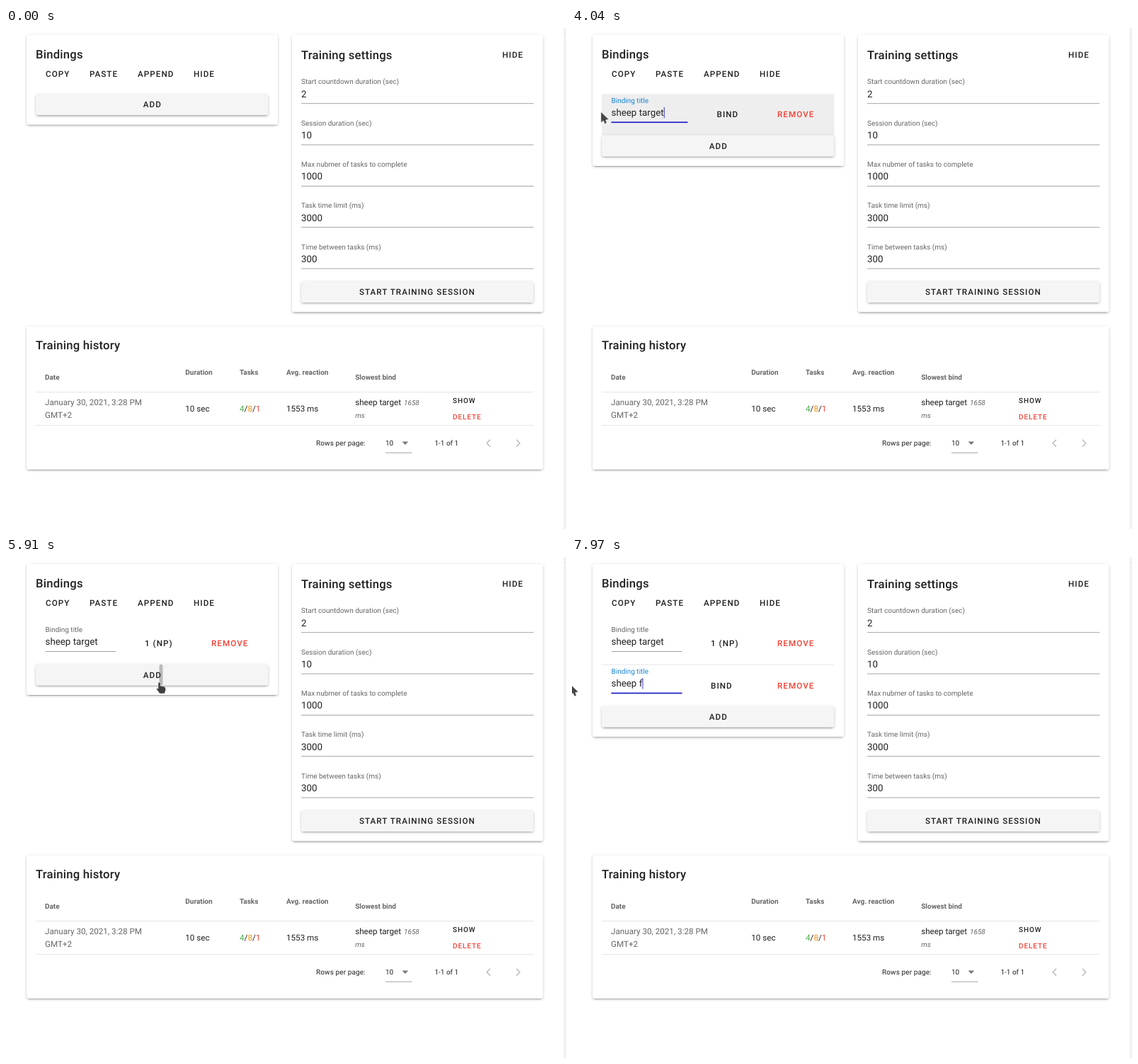
These frames come from a looping animation (791x708 px, 8 s). An HTML page:

```html
<!DOCTYPE html>
<html lang="en">
<head>
<meta charset="utf-8">
<title>Binding trainer</title>
<style>
html, body { margin: 0; width: 100%; height: 100%; overflow: hidden; background: #fff; }
svg { display: block; width: 791px; height: 708px; }
text { font-family: Roboto, sans-serif; white-space: pre; text-rendering: geometricPrecision; }
</style>
</head>
<body>
<svg viewBox="0 0 791 708" xmlns="http://www.w3.org/2000/svg">
  <g id="page"></g>
  <g id="live"></g>
</svg>
<script>
const LOOP = 8000;
const INK = '#212121', DIM = '#666', RED = '#f44336', LINE = '#949494', RULE = '#e0e0e0';
const BLUE = '#1d1cc4', LABEL_BLUE = '#1785d0';
const INPUT = 13.333, BUTTON = 11.667, SMALL = 10;
const ROW_TOP = 93.33, ROW_H = 58.33, ROW_STEP = 59.17, FIELD_X = 55.5;

const rect = (x, y, w, h, fill, extra = '') =>
  `<rect x="${x}" y="${y}" width="${w}" height="${h}" fill="${fill}" ${extra}/>`;
const text = (x, y, size, str, fill = INK, extra = '') =>
  `<text x="${x}" y="${y}" font-size="${size}" fill="${fill}" ${extra}>${str}</text>`;
const title = (x, y, str) =>
  text(x, y, 16.667, str, INK, 'font-weight="500" letter-spacing=".0125em"');
const caps = (x, y, str, fill = INK, size = BUTTON) =>
  text(x, y, size, str, fill, 'font-weight="500" letter-spacing=".0893em"');

// Raised surface with three soft shadows
function raised(x, y, w, h, fill) {
  const shade = (inset, dy, blur, alpha) =>
    rect(x + inset, y + inset + dy, w - 2 * inset, h - 2 * inset, '#000',
      `rx="3.3" fill-opacity="${alpha}" style="filter:blur(${blur}px)"`);
  return shade(1.67, 2.5, .42, .2) + shade(0, 1.67, .83, .14) + shade(0, .83, 2.08, .12) +
    rect(x, y, w, h, fill, 'rx="3.3"');
}

function settings() {
  const fields = [
    ['Start countdown duration (sec)', 2],
    ['Session duration (sec)', 10],
    ['Max nubmer of tasks to complete', 1000],
    ['Task time limit (ms)', 3000],
    ['Time between tasks (ms)', 300]
  ];
  return raised(404, 10, 354.6, 391.6, '#fff') +
    title(417, 44, 'Training settings') + caps(701, 42.2, 'HIDE') +
    fields.map(([label, value], i) => {
      const y = i * 58.33;
      return text(417, 79.3 + y, SMALL, label, DIM) + text(417, 97.8 + y, INPUT, value) +
        rect(417, 106.3 + y, 328.3, .85, LINE);
    }).join('') +
    raised(417, 358.2, 328.3, 30, '#f5f5f5') + caps(499, 377.3, 'START TRAINING SESSION');
}

function history() {
  const head = (x, y, str) => text(x, y, SMALL, str, DIM, 'font-weight="700"');
  const cell = (x, y, str, fill) => text(x, y, BUTTON, str, fill);
  const note = (x, y, str) => text(x, y, SMALL, str, DIM, 'font-style="italic"');
  const part = (fill, str) => `<tspan fill="${fill}">${str}</tspan>`;
  const chevron = (x, d) =>
    `<path d="M${x} 581.7l${d} 5l${-d} 5" fill="none" stroke="#b5b5b5" stroke-width="1.3"/>`;
  return raised(29, 421.5, 729.6, 202.5, '#fff') + title(42, 454, 'Training history') +
    head(55, 497.4, 'Date') + head(253.3, 490, 'Duration') + head(330, 490, 'Tasks') +
    head(396, 490, 'Avg. reaction') + head(493.2, 497.4, 'Slowest bind') +
    rect(42, 514.2, 703.3, .85, RULE) + rect(42, 561.2, 703.3, .85, RULE) +
    cell(55, 533.2, 'January 30, 2021, 3:28 PM', DIM) + cell(55, 550.8, 'GMT+2', DIM) +
    cell(253.3, 541.6, '10 sec') +
    cell(330, 541.6, part('#4caf50', 4) + '/' + part('#fb8c00', 8) + '/' + part(RED, 1)) +
    cell(396, 541.6, '1553 ms') + cell(493.2, 533.2, 'sheep target') +
    note(562, 533.2, '1658') + note(493.2, 550.8, 'ms') +
    caps(631, 529.8, 'SHOW', INK, SMALL) + caps(631, 553, 'DELETE', RED, SMALL) +
    text(438, 590, SMALL, 'Rows per page:', INK, 'letter-spacing=".1"') +
    text(536, 590, SMALL, '10') + text(605.4, 590, SMALL, '1-1 of 1') +
    rect(536, 599.8, 37.5, .85, LINE) +
    '<path d="M559.6 584.6h8.6l-4.3 4.4z" fill="#757575"/>' +
    chevron(684, -4.8) + chevron(721, 4.8);
}

document.getElementById('page').innerHTML =
  rect(0, 0, 791, 708, '#fff') + rect(787.5, 0, 3.5, 708, '#f1f1f1') +
  rect(788, 8, 3, .8, '#dcdcdc') + settings() + history();

const pen = document.createElement('canvas').getContext('2d');
pen.font = INPUT + 'px Roboto, sans-serif';
const widthOf = str => pen.measureText(str).width;
const clamp = v => Math.max(0, Math.min(1, v));
const easeOut = v => 1 - (1 - clamp(v)) ** 3;

// Pointer hotspot: time, x, y
const path = [
  [50, 488, 295], [200, 410, 240], [450, 280, 150], [650, 200, 112], [850, 217, 107],
  [950, 217, 107], [990, 220, 107], [1270, 220, 107], [1350, 160, 125], [1430, 87, 138],
  [1600, 112, 121], [1720, 112, 120], [2060, 47, 118], [2280, 41, 118], [4040, 41, 118],
  [4120, 33, 160], [4350, 259, 193], [4540, 250, 20], [4620, 235, 0], [4840, 222, 118],
  [5400, 222, 118], [5770, 217, 177], [5910, 217, 177], [6180, 88, 181],
  [6350, 112, 181], [6440, 112, 181], [6680, -2, 180], [8000, -2, 180]
];

const BOUND = 5400;
const rows = [
  { added: 1350, focus: 1720, blur: 4890, word: 'sheep target',
    keys: [2470, 2580, 2690, 2800, 2910, 3010, 3120, 3230, 3330, 3540, 3640, 3740] },
  { added: 5980, focus: 6480, blur: Infinity, word: 'sheep f',
    keys: [7020, 7220, 7290, 7440, 7700, 7870, 7970] }
];
const addClicks = [1270, 5910], bindClick = 4900;

function pointerAt(t) {
  if (t < path[0][0]) return { x: -99, y: -99 };
  const i = Math.max(1, path.findIndex(p => p[0] > t));
  const [t0, x0, y0] = path[i - 1], [t1, x1, y1] = path[i];
  const k = (t - t0) / (t1 - t0);
  return { x: x0 + (x1 - x0) * k, y: y0 + (y1 - y0) * k };
}

const inside = (p, x, y, w, h) => p.x >= x && p.x <= x + w && p.y >= y && p.y < y + h;

function rippleAlpha(dt) {
  return dt < 0 || dt > 400 ? 0 : .24 * (1 - clamp((dt - 200) / 200));
}

function drawInput(row, t, y, p) {
  const typed = row.keys.filter(k => k <= t).length;
  const str = typed ? row.word.slice(0, typed) : 'Bind title';
  const focused = t >= row.focus && t < row.blur;
  const base = y + 30.7;
  if (!focused) return text(FIELD_X, base, INPUT, str);
  if (typed) {
    const lit = (t - row.keys[typed - 1]) % 1000 < 500;
    return text(FIELD_X, base, INPUT, str) +
      (lit ? rect(FIELD_X + widthOf(str) + .2, y + 18.5, .9, 15.5, BLUE) : '');
  }
  let from = 0;
  while (from < str.length && FIELD_X + widthOf(str.slice(0, from + 1)) < p.x + 3) from++;
  const x = FIELD_X + widthOf(str.slice(0, from));
  return rect(x, y + 18.5, FIELD_X + widthOf(str) - x, 15.5, '#3390ff') +
    text(FIELD_X, base, INPUT, `${str.slice(0, from)}<tspan fill="#fff">${str.slice(from)}</tspan>`);
}

function drawRow(i, t, p) {
  const row = rows[i], y = ROW_TOP + i * ROW_STEP;
  const bound = t >= BOUND;
  const fieldW = bound ? 100 : 108, bindX = bound ? 196 : 204.5;
  const focused = t >= row.focus && t < row.blur;
  const btn = [bindX - 13.3, y + 13.8, 262.3 - bindX - .3, 30];
  const field = [FIELD_X, y + 12, fieldW, 28];
  const remove = [276.5, y + 13.8, 79, 30];
  const overBind = inside(p, ...btn), overRemove = inside(p, ...remove);
  let out = '';
  if (i) out += rect(42, y - .9, 328.5, .85, RULE);
  if (inside(p, 40, y, 330, ROW_H)) out += rect(42, y, 328.5, ROW_H, '#eee');
  out += text(FIELD_X, y + 12.6, SMALL, 'Binding title', focused ? LABEL_BLUE : DIM) +
    rect(FIELD_X, y + 39.8, fieldW, .85, LINE);
  if (focused) {
    const w = fieldW * easeOut((t - row.focus) / 320);
    out += rect(FIELD_X + (fieldW - w) / 2, y + 39.1, w, 1.67, BLUE);
  }
  out += drawInput(row, t, y, p);
  const glow = (overBind ? .08 : 0) + (i ? 0 : rippleAlpha(t - bindClick) * .5);
  if (glow) out += rect(...btn, '#000', `rx="3.3" fill-opacity="${glow}"`);
  if (overRemove) out += rect(...remove, RED, 'rx="3.3" fill-opacity=".08"');
  out += caps(bindX, y + 33.1, i || !bound ? 'BIND' : '1 (NP)') + caps(290, y + 33.1, 'REMOVE', RED);
  const kind = overBind || overRemove ? 'hand' : inside(p, ...field) ? 'beam' : '';
  return { out, kind };
}

const shapes = {
  arrow: '<path d="M0 0V15.3L3.5 12.4L5.4 17L8.2 15.8L6.7 11.5L11 10.7Z" fill="#454545" stroke="#fff" stroke-width=".5"/>',
  hand: '<path d="M-1.6 1.2Q0-1.2 1.6 1.2V5L6.6 6Q9 6.6 9 9V11.5L7.4 16H.6L-4 9.8Q-3.6 7.8-1.6 9Z" fill="#404040" stroke="#fff" stroke-width=".5"/>',
  beam: '<path d="M-2.8-7Q0-7 0-5.6Q0-7 2.8-7M0-6V6M-2.8 7Q0 7 0 5.6Q0 7 2.8 7" fill="none" stroke="#555" stroke-width="1.1"/>'
};

function render(t) {
  const p = pointerAt(t);
  const count = rows.filter(r => t >= r.added).length;
  const addY = ROW_TOP + (count ? ROW_H + (count - 1) * ROW_STEP : 0);
  let kind = inside(p, 42, addY, 328.5, 30) ? 'hand' : 'arrow';
  let out = raised(29, 10, 355, addY + 33.4, '#fff') + title(42, 42.5, 'Bindings') +
    caps(56, 69, 'COPY') + caps(118, 69, 'PASTE') + caps(186, 69, 'APPEND') + caps(265, 69, 'HIDE');
  for (let i = 0; i < count; i++) {
    const row = drawRow(i, t, p);
    out += row.out;
    kind = row.kind || kind;
  }
  out += raised(42, addY, 328.6, 30, '#f5f5f5');
  for (const click of addClicks) {
    const alpha = rippleAlpha(t - click);
    if (!alpha) continue;
    const r = 185 * easeOut((t - click) / 220);
    const left = Math.max(42, 219 - r), right = Math.min(370.6, 219 + r);
    out += rect(left, addY, right - left, 30, '#000', `rx="3.3" fill-opacity="${alpha}"`);
  }
  out += caps(193.7, addY + 19.1, 'ADD');
  out += `<g transform="translate(${p.x} ${p.y})">${shapes[kind]}</g>`;
  document.getElementById('live').innerHTML = out;
}

const start = performance.now();
function tick() {
  render((performance.now() - start) % LOOP);
  requestAnimationFrame(tick);
}
tick();
</script>
</body>
</html>
```
